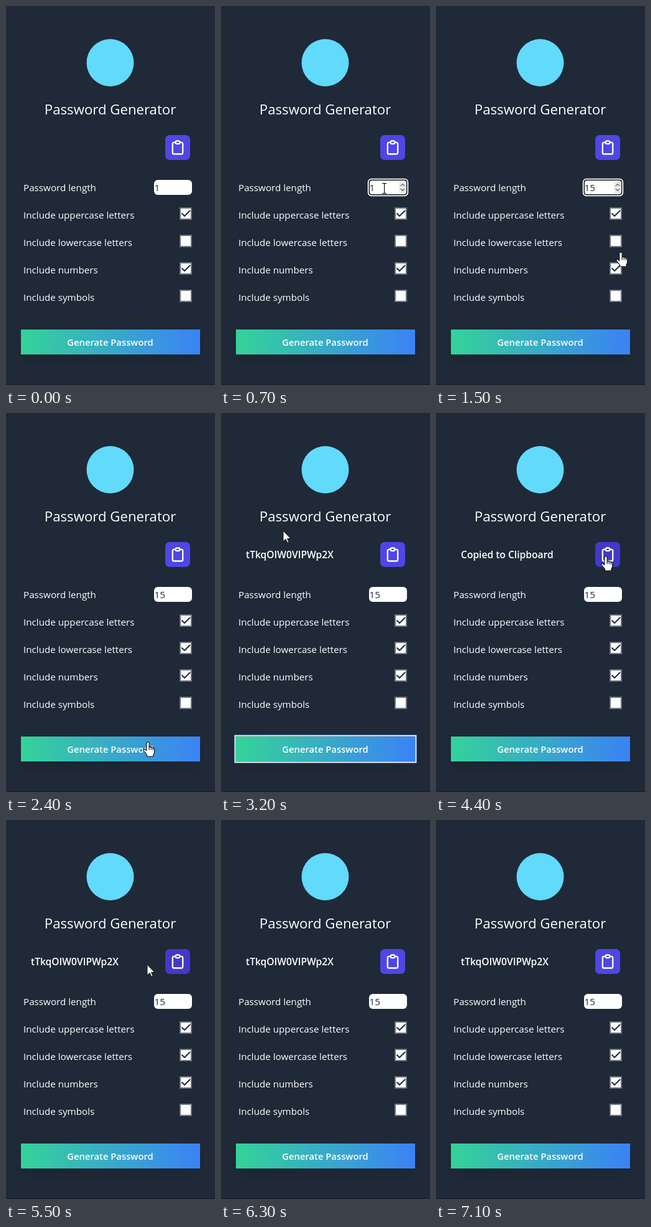
Recreate the animation shown at these times as an HTML page. Size 336 px wide and 608 px high, loop 7200 ms.

```html
<!DOCTYPE html>
<html lang="en">
<head>
<meta charset="utf-8">
<title>Password Generator</title>
<style>
html, body { margin: 0; width: 100%; height: 100%; overflow: hidden; background: #1f2937; }
svg { display: block; width: 336px; height: 608px; }
text { font-family: "Open Sans", "Noto Sans", sans-serif; font-size: 15.2px; fill: #fff; }
.title { font-size: 22.2px; }
.bold { font-weight: 600; font-size: 14.8px; }
#result { font-size: 15.6px; }
.line { fill: none; stroke-linecap: round; stroke-linejoin: round; }
</style>
</head>
<body>
<svg viewBox="0 0 336 608">
  <defs>
    <linearGradient id="fade">
      <stop offset="0" stop-color="#34d399"/>
      <stop offset="1" stop-color="#3b82f6"/>
    </linearGradient>
    <filter id="blur" x="-10%" y="-80%" width="120%" height="260%">
      <feGaussianBlur stdDeviation="7"/>
    </filter>
  </defs>
  <rect width="336" height="608" fill="#1f2937"/>
  <rect y="607" width="336" height="1" fill="#151b29"/>
  <circle cx="167.5" cy="91" r="38" fill="#61dafb"/>
  <text class="title" x="167.5" y="174" text-anchor="middle">Password Generator</text>

  <text id="result" class="bold" x="40" y="233"></text>
  <rect id="copy" x="256" y="207" width="40" height="40" rx="7"/>
  <g class="line" stroke="#fff" stroke-width="2" transform="translate(262 213) scale(1.167)">
    <path d="M9 5H7Q5 5 5 7V19Q5 21 7 21H17Q19 21 19 19V7Q19 5 17 5H15"/>
    <rect x="9" y="3" width="6" height="4" rx="2"/>
  </g>

  <text x="28" y="297">Password length</text>
  <rect x="238" y="279" width="61" height="24" rx="6" fill="#fff"/>
  <text id="length" x="238.5" y="297" style="fill:#1f2937"></text>
  <g id="spinner">
    <rect x="286" y="281" width="12" height="20" fill="#ececec"/>
    <path class="line" d="M289 288.5L292 285.5L295 288.5M289 293.5L292 296.5L295 293.5" stroke="#737373" stroke-width="1.5"/>
  </g>
  <g id="inputRing" fill="none">
    <rect x="238.3" y="279.3" width="60.4" height="23.4" rx="4" stroke="#101018" stroke-width="1.5"/>
    <rect x="236.7" y="277.7" width="63.6" height="26.6" rx="5" stroke="#fff" stroke-width="1.8"/>
  </g>
  <g id="options"></g>

  <rect x="27" y="532" width="282" height="34" fill="#000" opacity=".1" filter="url(#blur)"/>
  <g id="buttonRing" fill="none">
    <rect x="21.3" y="516.3" width="293.4" height="45.4" stroke="#2d5494" stroke-width="1"/>
    <rect x="22.7" y="517.7" width="290.6" height="42.6" stroke="#fff" stroke-width="1.8"/>
  </g>
  <rect x="24" y="519" width="288" height="40" fill="url(#fade)"/>
  <text class="bold" x="167.5" y="545" text-anchor="middle">Generate Password</text>

  <g id="cursor">
    <path id="arrow" d="M0 0V17L4 13.3L6.8 19.2L9.2 18.2L6.5 12.5H12Z" fill="#fff" stroke="#111" stroke-width="1"/>
    <g id="hand" stroke="#111" stroke-width="1.2">
      <path fill="#fff" stroke-linejoin="round" d="M-2.2 1.8Q-2 0 0 0Q2 0 2.2 1.8V8Q3.7 6.8 5.3 8.3Q7 7.4 8.3 9.3Q10.7 9 10.7 11.5V15Q10.7 18 9 20V23H-1.5V20.5L-7 13.5Q-7.5 11 -5.2 11.2L-2.2 13.5Z"/>
      <path class="line" d="M2.2 8V12M5.3 8.5V12M8.3 9.5V12.5"/>
    </g>
    <path id="beam" class="line" d="M-3 -8H3M0 -8V8M-3 8H3" stroke="#111" stroke-width="1.2"/>
  </g>
</svg>
<script>
const LOOP = 7200, STEP = 100;
const $ = id => document.getElementById(id);
const show = (id, on) => $(id).setAttribute("visibility", on ? "visible" : "hidden");
const within = (t, a, b) => t >= a && t < b;

const labels = ["uppercase letters", "lowercase letters", "numbers", "symbols"];
$("options").innerHTML = labels.map((label, i) => {
  const y = 333 + 44 * i;
  return `<text x="28" y="${y + 8}">Include ${label}</text>
    <rect x="280" y="${y - 9}" width="18" height="18" fill="#fff" stroke="#6b7280" stroke-width="2"/>
    <path id="tick${i}" class="line" d="M283 ${y}L287 ${y + 4}L295.5 ${y - 4.5}" stroke="#1f2937" stroke-width="2"/>`;
}).join("");

// time, x, y, pointer shape until the next stop
const stops = [
  [200, 205, 575, "arrow"], [600, 262, 292, "beam"], [1200, 266, 296, "beam"],
  [1300, 278, 328, "arrow"], [1500, 297, 395, "hand"], [1600, 290, 377, "hand"],
  [1800, 290, 380, "arrow"], [2200, 242, 505, "arrow"], [2300, 232, 522, "hand"],
  [2400, 228, 528, "hand"], [2700, 228, 528, "arrow"], [3200, 100, 189, "arrow"],
  [3400, 104, 194, "arrow"], [3800, 262, 228, "hand"], [3900, 273, 230, "hand"],
  [5200, 273, 230, "hand"], [5400, 240, 232, "arrow"], [5500, 227, 232, "arrow"],
  [6100, -15, 290, "arrow"]
];

function pointer(t) {
  const i = stops.findIndex((s, k) => stops[k + 1] && within(t, s[0], stops[k + 1][0]));
  if (i < 0) return null;
  const [t0, x0, y0, shape] = stops[i], [t1, x1, y1] = stops[i + 1];
  const p = (t - t0) / (t1 - t0);
  return { x: x0 + (x1 - x0) * p, y: y0 + (y1 - y0) * p, shape };
}

function draw(t) {
  show("inputRing", within(t, 700, 1700));
  show("spinner", within(t, 600, 1700));
  $("length").textContent = t < 1000 ? "1" : "15";

  [true, t >= 1700, true, false].forEach((on, i) => show("tick" + i, on));
  show("buttonRing", within(t, 2600, 4100));

  $("result").textContent = t < 2600 ? "" :
    within(t, 4100, 5100) ? "Copied to Clipboard" : "tTkqOIW0VIPWp2X";
  $("copy").setAttribute("fill", within(t, 3800, 5600) ? "#4338ca" : "#4f46e5");

  const at = pointer(t);
  for (const id of ["arrow", "hand", "beam"]) show(id, at && at.shape === id);
  if (at) $("cursor").setAttribute("transform", `translate(${at.x} ${at.y})`);
}

const start = performance.now();
function tick() {
  const t = (performance.now() - start) % LOOP;
  draw(Math.floor(t / STEP) * STEP);
  requestAnimationFrame(tick);
}
tick();
</script>
</body>
</html>
```
